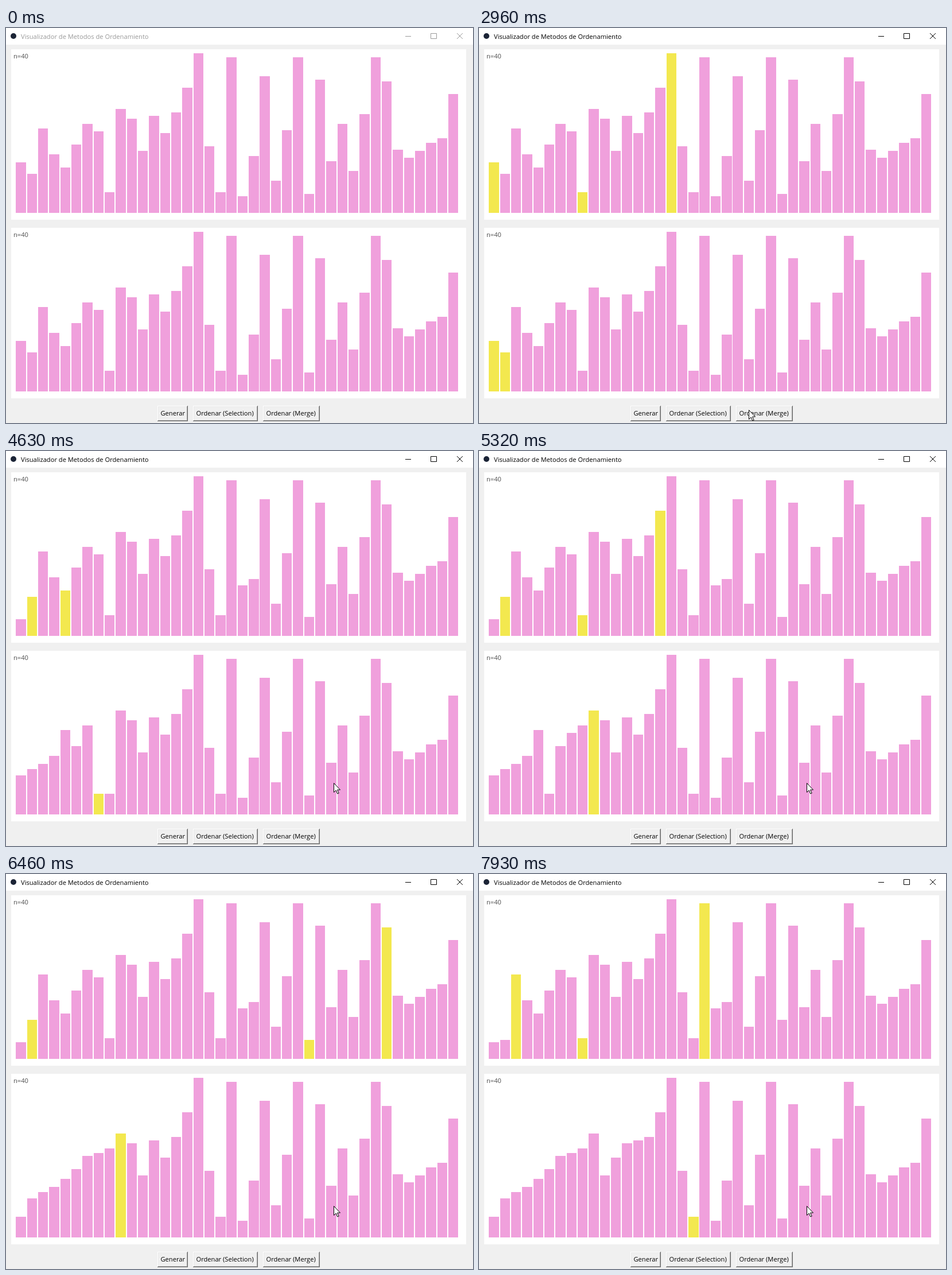
These frames come from a looping animation (814x688 px, 7990 ms). An HTML page:

```html
<!DOCTYPE html>
<html lang="es">
<head>
<meta charset="utf-8">
<title>Visualizador de Metodos de Ordenamiento</title>
<style>
  html, body { margin: 0; width: 100%; height: 100%; overflow: hidden; background: #f0f0f0; }
  svg { display: block; }
  text { font: 11.15px "Open Sans", "Noto Sans", sans-serif; }
  .bars { fill: #f0a0dc; shape-rendering: crispEdges; }
  .bars .hot { fill: #f3e84f; }
  .count { fill: #505050; }
  .edge { fill: none; shape-rendering: crispEdges; }
  #chrome { color: #999; }
  #chrome.active { color: #000; }
  #chrome text { fill: currentColor; }
  #chrome path { fill: none; stroke: currentColor; }
</style>
</head>
<body>
<svg id="stage" width="814" height="688" viewBox="0 0 814 688">
  <rect width="814" height="29" fill="#fff"/>
  <circle cx="13" cy="14" r="5" fill="#1b2436"/>
  <g id="chrome">
    <text x="26" y="19">Visualizador de Metodos de Ordenamiento</text>
    <path d="M696 14.5H706M740.5 9.5H750.5V18.5H740.5ZM786 9L796 19M796 9L786 19"/>
  </g>
  <g id="content"></g>
  <path id="cursor" d="M.5 .5V16.5L4.2 13 6.8 19 9.2 18 6.6 12.1H11.5Z" fill="#fff" stroke="#000"/>
</svg>
<script>
const LOOP = 7990, ACTIVATE = 1930;
const heights = [88, 68, 147, 102, 79, 119, 155, 142, 36, 181, 164, 108, 169, 139, 175, 218, 278, 116, 36, 271,
  29, 99, 238, 56, 144, 271, 33, 232, 90, 155, 73, 172, 271, 229, 110, 96, 108, 122, 130, 207];
const $ = id => document.getElementById(id);

function add(parent, tag, attrs, text = '') {
  const el = document.createElementNS('http://www.w3.org/2000/svg', tag);
  for (const k in attrs) el.setAttribute(k, attrs[k]);
  el.textContent = text;
  return parent.appendChild(el);
}

// Each sort yields the indices to highlight
function* selectionSort(a) {
  for (let i = 0; i < a.length - 1; i++) {
    let min = i;
    for (let j = i + 1; j < a.length; j++) {
      if (a[j] < a[min]) min = j;
      yield [i, min, j];
    }
    [a[i], a[min]] = [a[min], a[i]];
    yield [i, min];
  }
}

function* mergeSort(a, lo = 0, hi = a.length) {
  if (hi - lo < 2) return;
  const mid = (lo + hi) >> 1;
  yield* mergeSort(a, lo, mid);
  yield* mergeSort(a, mid, hi);
  const left = a.slice(lo, mid), right = a.slice(mid, hi);
  let i = 0, j = 0;
  for (let k = lo; k < hi; k++) {
    const both = i < left.length && j < right.length;
    if (both) yield [lo + i, mid + j];
    const takeLeft = both ? left[i] <= right[j] : i < left.length;
    a[k] = takeLeft ? left[i++] : right[j++];
    yield [k];
  }
}

function panel(y, sort, start, period) {
  add($('content'), 'rect', { x: 9, y, width: 793, height: 297, fill: '#fff' });
  add($('content'), 'text', { x: 13, y: y + 15.5, class: 'count' }, 'n=40');
  const group = add($('content'), 'g', { class: 'bars' });
  const bars = heights.map((h, i) => {
    const x = 17.3 + 19.325 * i, left = Math.round(x);
    return add(group, 'rect', { x: left, width: Math.round(x + 17.4) - left });
  });
  const a = [...heights], steps = [];
  for (const hot of sort(a)) {
    steps.push({ values: [...a], hot });
    if (steps.length > (LOOP - start) / period) break;
  }
  const idle = { values: heights, hot: [] };
  return t => {
    const { values, hot } = steps[Math.floor((t - start) / period)] || idle;
    bars.forEach((bar, i) => {
      bar.setAttribute('y', y + 285 - values[i]);
      bar.setAttribute('height', values[i]);
      bar.classList.toggle('hot', hot.includes(i));
    });
  };
}

function button(x, width, label, down = 0, up = 0) {
  const y = 658, r = x + width, b = 685;
  const corner = (d, inset) => add($('content'), 'path', {
    class: 'edge',
    d: d ? `M${x + inset} ${b - inset - .5}H${r - inset - .5}V${y + inset}`
         : `M${x + inset + .5} ${b - inset}V${y + inset + .5}H${r - inset}`
  });
  const edges = [corner(0, 0), corner(0, 1), corner(1, 1), corner(1, 0)];
  const raised = ['#fff', '#e8e8e8', '#a0a0a0', '#696969'];
  const sunken = ['#696969', '#a0a0a0', '#e8e8e8', '#fff'];
  const text = add($('content'), 'text', { x: x + 5.5, y: 675 }, label);
  return t => {
    const pressed = t >= down && t < up;
    edges.forEach((e, i) => e.setAttribute('stroke', (pressed ? sunken : raised)[i]));
    text.setAttribute('transform', pressed ? 'translate(1 1)' : '');
  };
}

// time, x, y
const path = [[460, 645, 686], [1190, 416, 674], [1460, 410, 670], [2050, 410, 670],
  [2650, 470, 665], [2960, 470, 665], [3500, 570.5, 578], [LOOP, 570.5, 578]];

function moveCursor(t) {
  const cursor = $('cursor');
  cursor.style.display = t < path[0][0] ? 'none' : '';
  const n = path.findIndex(p => p[0] > t);
  if (n < 1) return;
  const [t0, x0, y0] = path[n - 1], [t1, x1, y1] = path[n];
  const u = (t - t0) / (t1 - t0);
  const e = n < 3 ? u * (2 - u) : u * u * (3 - 2 * u);
  const x = Math.round(x0 + (x1 - x0) * e), y = Math.round(y0 + (y1 - y0) * e);
  cursor.setAttribute('transform', `translate(${x} ${y})`);
}

const parts = [
  panel(37, selectionSort, 1990, 62.4),
  panel(348, mergeSort, 2958, 62.1),
  button(264, 53, 'Generar'),
  button(326, 113, 'Ordenar (Selection)', ACTIVATE, 1990),
  button(448, 99, 'Ordenar (Merge)', 2860, 2950),
  moveCursor,
  t => $('chrome').classList.toggle('active', t >= ACTIVATE)
];

const begin = performance.now();
function frame() {
  const t = (performance.now() - begin) % LOOP;
  parts.forEach(draw => draw(t));
  requestAnimationFrame(frame);
}
frame();
</script>
</body>
</html>
```
